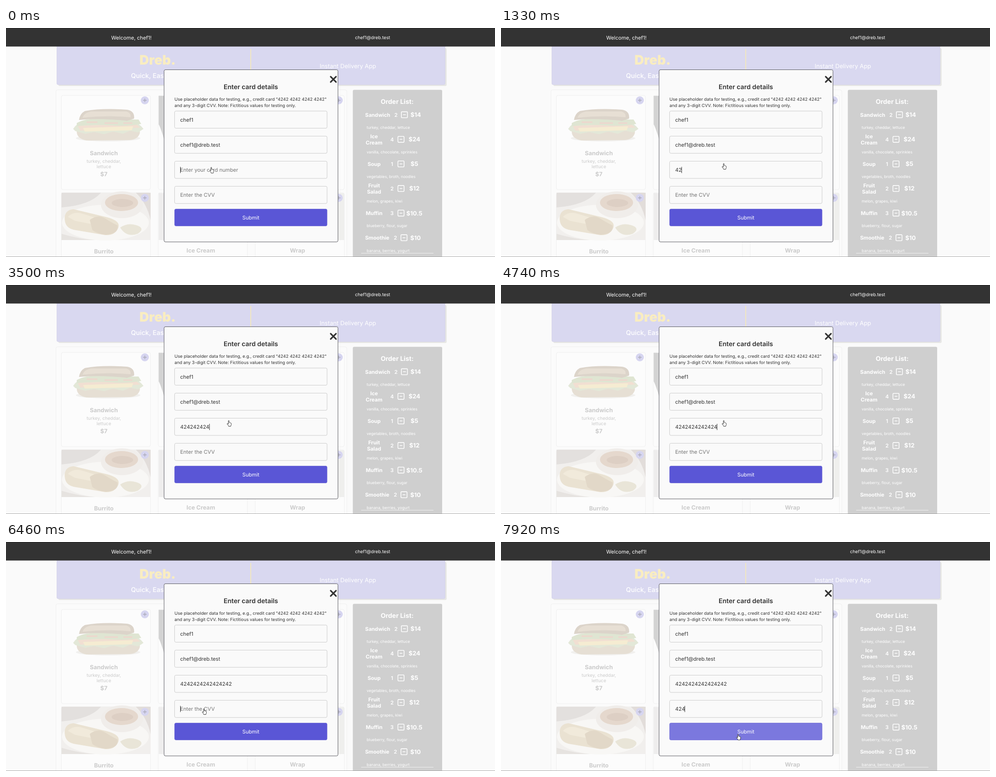
Animation, 1092 px wide and 513 px high, one loop 8 s. Source, as an HTML page:

```html
<!DOCTYPE html>
<html lang="en">
<head>
<meta charset="utf-8">
<title>Card details</title>
<style>
html, body { margin: 0; width: 100%; height: 100%; overflow: hidden; background: #fafafa; }
svg { display: block; width: 100vw; height: 100vh; }
text { font-family: Inter, "Liberation Sans", sans-serif; text-rendering: geometricPrecision; white-space: pre; }
</style>
</head>
<body>
<svg id="stage" viewBox="0 0 1092 513"></svg>
<script>
const stage = document.getElementById('stage');
const USER = 'chef1', MAIL = 'chef1@dreb.test', INK = '#333', FADED = '#cbcbcb';

function add(tag, attrs, parent = stage) {
  const el = document.createElementNS('http://www.w3.org/2000/svg', tag);
  for (const k in attrs) el.setAttribute(k, attrs[k]);
  parent.appendChild(el);
  return el;
}
const rect = (x, y, width, height, fill, more) => add('rect', { x, y, width, height, fill, ...more });
const path = (d, fill, more) => add('path', { d, fill, ...more });
const oval = (cx, cy, rx, ry, fill) => add('ellipse', { cx, cy, rx, ry, fill });

// y is the middle of the capitals
function label(str, x, y, size, fill, weight = 400, anchor = 'start') {
  const el = add('text', { x, y: y + size * 0.364, 'font-size': size, fill, 'font-weight': weight, 'text-anchor': anchor });
  el.textContent = str;
  return el;
}
const mid = (str, x, y, size, fill, weight) => label(str, x, y, size, fill, weight, 'middle');

function plus(x, y) {
  oval(x, y, 9, 9, '#d6d5f0');
  path(`M${x - 4} ${y}h8M${x} ${y - 4}v8`, 'none', { stroke: '#a9a9b6', 'stroke-width': 1.3 });
}

function sandwich() {
  oval(228, 247, 72, 7, '#f1f0ee');
  path('M158 232Q160 225 180 227L290 226Q302 228 298 238Q292 252 270 251L180 252Q158 248 158 232Z', '#e6dfd4');
  path('M150 226q8-14 22-13l110-2q16 2 25 15l-12 8-18-4-16 7-22-5-20 6-22-5-20 4-22-6Z', '#e3e8d8');
  path('M160 219l130-4 10 8-134 7Z', '#f1dfd2');
  path('M172 224l112-4-3 9-105 3Z', '#f5ecd2');
  path('M158 213q20-12 64-10t74 2l6 10q-34 6-70 3t-74 2Z', '#dfe5d2');
  path('M163 206Q165 192 176 186Q215 179 270 183Q288 186 286 203L270 208Q210 201 163 206Z', '#dcd4ca');
  path('M171 201Q174 190 190 187L268 187Q280 190 278 200Q225 195 171 201Z', '#e7dfd4');
  path('M180 211h24M220 213h30M262 213h20', 'none', { stroke: '#eed6cd', 'stroke-width': 3 });
}

function burrito() {
  rect(124, 369, 199, 106, '#f1efed');
  path('M124 369h88q-24 28-88 33Z', '#e3e0de');
  path('M290 369h33v62q-8-38-33-62Z', '#e2ddda');
  oval(222, 436, 97, 40, '#f8f7f5');
  oval(259, 396, 47, 30, '#f0edea');
  oval(258, 391, 37, 19, '#e5d8cd');
  oval(260, 392, 24, 9, '#ddcfc4');
  path('M131 424Q133 407 151 406L226 424Q256 432 251 447Q244 465 222 464L151 452Q130 447 131 424Z', '#eae2d2');
  path('M138 423q12-12 29-8l60 18q18 9 9 15l-82-16Z', '#f1eadb');
  path('M187 430q18-14 35-3t27 15q3 16-17 20t-39-9Z', '#e2d8c8');
  path('M255 447q17-12 37-5t2 19q-25 9-39-14Z', '#e9e5d8');
  path('M124 461q40 12 75 14h-75Z', '#e6e3e0');
}

function page() {
  rect(0, 0, 1092, 513, '#fafafa');
  rect(117, 45, 867, 85, '#e7e7e5', { rx: 3 });
  rect(113.5, 36, 867, 91, '#d9d8f0', { rx: 3, stroke: '#d0cfe6', 'stroke-width': 0.7 });
  rect(0, 0, 1092, 41.5, INK);
  rect(0, 0, 1092, 1, '#222');
  label(`Welcome, ${USER}!`, 235, 21.5, 11.6, '#fff');
  label(MAIL, 779.5, 21.5, 10.2, '#fff');
  label('Dreb.', 298, 71.5, 29.5, '#f9edc1', 900);
  label('Quick, Easy', 279, 106.5, 14.6, '#fff', 500);
  label('Instant Delivery App', 700.5, 85, 13.2, '#fff');
  rect(545.7, 47, 1.6, 46, '#f8ebb4');

  rect(111.5, 138.5, 649.5, 390, '#fbfbfb', { rx: 4, stroke: '#efefef' });
  for (const x of [123.5, 340, 556.5])
    for (const y of [151, 369]) rect(x, y, 199, 211, '#fcfcfc', { rx: 4, stroke: '#efefef' });
  sandwich();
  burrito();
  path('M341 152h14v104q-10-34-14-40Z', '#d3d3d3');
  rect(341, 370, 14, 105, '#eeeded');
  rect(738, 370, 17, 105, '#efefed');
  for (const x of [310, 743]) for (const y of [162, 380.5]) plus(x, y);
  mid('Sandwich', 218.5, 280, 13, FADED, 700);
  mid('turkey, cheddar,', 218.5, 298, 10.1, FADED);
  mid('lettuce', 218.5, 310, 10.1, FADED);
  mid('$7', 218.5, 327.5, 13, FADED, 700);
  mid('Burrito', 218.5, 500, 13, FADED, 700);
  mid('Ice Cream', 435, 498, 13, FADED, 700);
  mid('Wrap', 651, 498, 13, FADED, 700);
}

function orders() {
  rect(774.5, 138.5, 199.5, 390, '#cfcfcf', { rx: 3 });
  mid('Order List:', 873.5, 165, 14.4, '#fff', 700);
  const rows = [
    ['Sandwich', 2, '$14', 'turkey, cheddar, lettuce', 8],
    ['Ice Cream', 4, '$24', 'vanilla, chocolate, sprinkles', 0],
    ['Soup', 1, '$5', 'vegetables, broth, noodles', 0],
    ['Fruit Salad', 2, '$12', 'melon, grapes, kiwi', 0],
    ['Muffin', 3, '$10.5', 'blueberry, flour, sugar', 0],
    ['Smoothie', 2, '$10', 'banana, berries, yogurt', 7]
  ];
  rows.forEach(([name, count, price, parts, dx], i) => {
    const y = 194.3 + i * 55.1;
    const words = name.split(' ');
    words.forEach((w, k) => mid(w, 822 + dx, y + (k - (words.length - 1) / 2) * 14, 11.6, '#fff', 700));
    mid(count, 862 + dx * 1.1, y, 11.6, '#fff', 600);
    rect(875.3 + dx * 0.95, y - 6.7, 13.6, 13.4, 'none', { rx: 1.5, stroke: '#fff', 'stroke-width': 1.6 });
    rect(879 + dx * 0.95, y - 0.8, 6.2, 1.6, '#fff');
    mid(price, 912 + dx * 0.37, y, 13.4, '#fff', 700);
    label(parts, 805.5, y + 28.6, 8.7, '#fff');
  });
  rect(793, 504, 161.5, 1, '#f2f2f2');
}

function modal() {
  rect(353, 93.5, 388.3, 385.7, '#fafafa', { rx: 3, stroke: '#55555c' });
  path('M725 109l12 12m0-12l-12 12', 'none', { stroke: INK, 'stroke-width': 3.2, 'stroke-linecap': 'round' });
  mid('Enter card details', 546.7, 131.5, 14.4, INK, 600);
  label('Use placeholder data for testing, e.g., credit card "4242 4242 4242 4242"', 376.3, 159.7, 9.68, INK);
  label('and any 3-digit CVV. Note: Fictitious values for testing only.', 376.3, 173.7, 9.68, INK);
  for (let i = 0; i < 4; i++)
    rect(376.5, 186 + i * 56.2, 340.5, 38.5, '#fafafa', { rx: 3, stroke: '#cacaca' });
  label(USER, 389, 205.3, 11.6, INK);
  label(MAIL, 389, 261.5, 11.6, INK);
}

page();
orders();
modal();

function field(y, hint) {
  return { y, hint: label(hint, 389, y, 11.6, '#757575'), value: label('', 389, y, 11.6, INK) };
}
const card = field(317.8, 'Enter your card number');
const cvv = field(374, 'Enter the CVV');
const button = rect(376.5, 405.5, 340.5, 38, '#5a56d6', { rx: 3, stroke: '#6c69d3', 'stroke-width': 0.8 });
mid('Submit', 546.8, 424.5, 11.6, '#fff');
rect(0, 512, 1092, 1, '#a5a5a5');
const caret = rect(0, 0, 1, 14, '#333');
const hand = path('M3.5 8V1.6Q3.5.5 4.4.5T5.3 1.6V5Q6.8 4.6 7 5.6 8.4 5.2 8.6 6.2 10 6 10 7.2V9.5Q10 11 9 12.2V13.5H4V12.3L1 8.8Q.3 7.7 1.2 7.3 2 7 2.7 7.8L3.5 8.8Z',
  '#fff', { stroke: '#222', 'stroke-width': 0.9, 'stroke-linejoin': 'round' });

const LOOP = 8000;
const cardKeys = [1080, 1330, 1470, 1720, 2400, 2530, 2840, 3000, 3500, 3650, 4180, 4310, 4740, 4990, 5240, 5500];
const cvvKeys = [7230, 7380, 7500];
const spots = [[0, 454, 311.5], [120, 453.5, 311], [410, 493, 303], [6030, 467.5, 335], [6180, 437, 375],
  [6310, 437.5, 373], [7780, 498, 417], [7920, 525, 430]];
const caretOff = [[410, 950], [6030, 6310], [6970, 7230]];

function type(f, keys, t) {
  const n = keys.filter(k => k <= t).length;
  f.value.textContent = '42'.repeat(8).slice(0, n);
  f.hint.setAttribute('visibility', n ? 'hidden' : 'visible');
}

function draw(t) {
  type(card, cardKeys, t);
  type(cvv, cvvKeys, t);
  const active = t < 6180 ? card : cvv;
  const shown = !caretOff.some(([a, b]) => t >= a && t < b);
  const typed = active.value.textContent ? active.value.getComputedTextLength() : 0;
  caret.setAttribute('x', Math.round(388.6 + typed));
  caret.setAttribute('y', Math.round(active.y - 7));
  caret.setAttribute('visibility', shown ? 'visible' : 'hidden');
  const [, x, y] = spots.filter(s => s[0] <= t).pop();
  hand.setAttribute('transform', `translate(${x} ${y})`);
  button.setAttribute('fill', t < 7920 ? '#5a56d6' : '#7b78de');
}

const start = performance.now();
function tick() {
  draw((performance.now() - start) % LOOP);
  requestAnimationFrame(tick);
}
tick();
</script>
</body>
</html>
```
